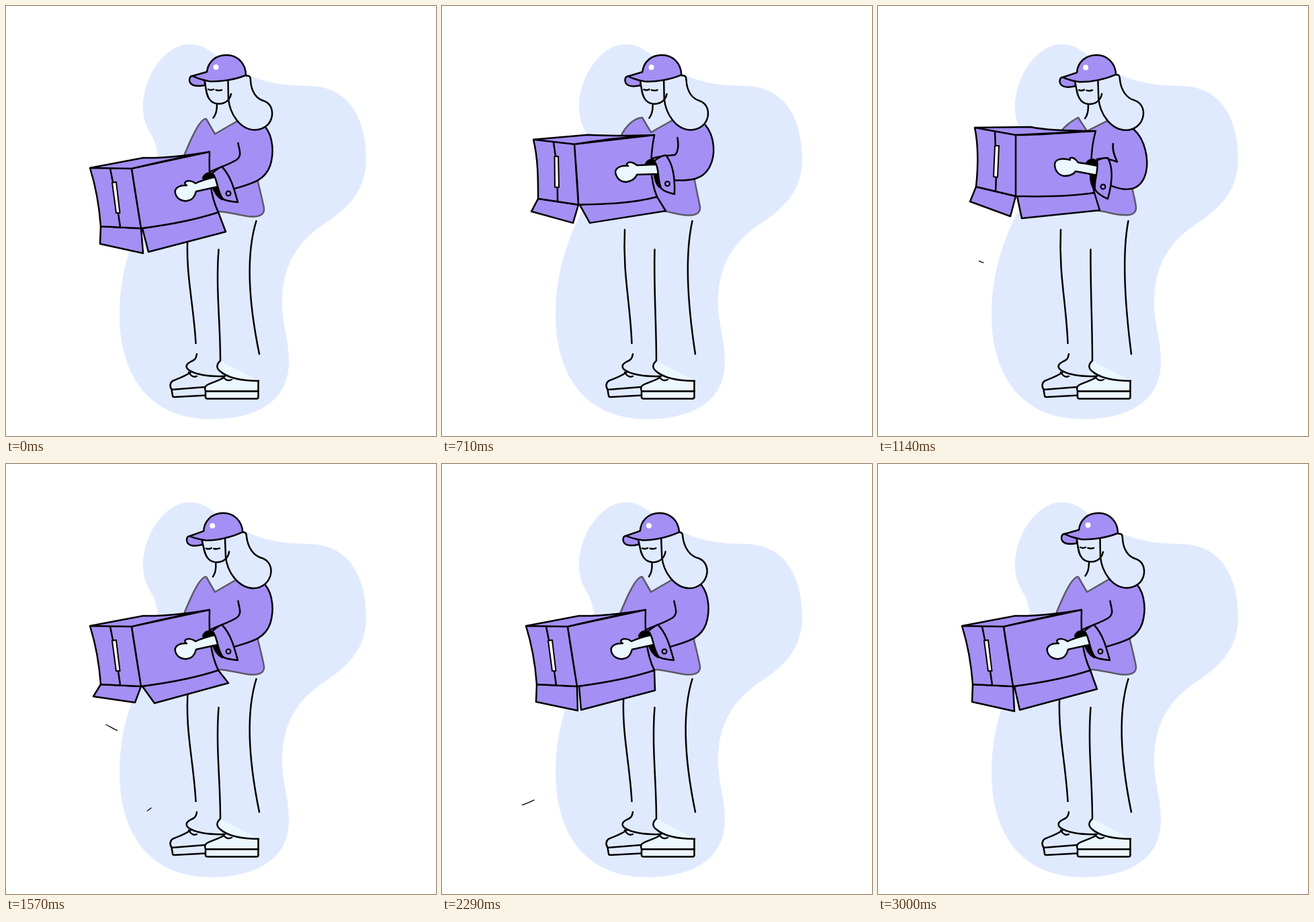
An HTML page with a canvas for the animation above (3.07 s loop, 640 by 640 pixels).

```html
<!DOCTYPE html>
<html lang="en">
<head>
<meta charset="utf-8">
<title>Courier with a box</title>
<style>
html, body { margin: 0; height: 100%; overflow: hidden; background: #fff; }
canvas { display: block; width: 100vw; height: 100vh; }
</style>
</head>
<body>
<canvas width="640" height="640"></canvas>
<script>
const ctx = document.querySelector('canvas').getContext('2d');
const LOOP = 3070, STEP = LOOP / 43;
const PURPLE = '#a48ff4', SKY = '#e0eaff', PALE = '#ebf8ff', INK = '#000', GREY = '#5c5a66';
const NUM = /-?\d+(\.\d+)?/g;

// Monotone cubic through keyed values, held outside the keys
function curve(times, v) {
  const n = times.length;
  const d = i => (v[i + 1] - v[i]) / (times[i + 1] - times[i]);
  const slope = i => {
    if (i === 0 || i === n - 1) return 0;
    const a = d(i - 1), b = d(i);
    return a * b <= 0 ? 0 : 2 * a * b / (a + b);
  };
  return t => {
    if (t <= times[0]) return v[0];
    if (t >= times[n - 1]) return v[n - 1];
    const i = times.findIndex(x => x > t) - 1;
    const w = times[i + 1] - times[i], u = (t - times[i]) / w;
    const s = u * u * (3 - 2 * u);
    return v[i] + (v[i + 1] - v[i]) * s +
      w * u * (1 - u) * (slope(i) * (1 - u) - slope(i + 1) * u);
  };
}

// Morph between path strings that share one structure
function morph(times, paths) {
  const nums = paths.map(p => p.match(NUM).map(Number));
  const curves = nums[0].map((_, i) => curve(times, nums.map(a => a[i])));
  return t => {
    let i = 0;
    return paths[0].replace(NUM, () => curves[i++](t).toFixed(2));
  };
}

const pose = (a, b, c, d) => morph([0, 360, 710, 1140, 1570], [a, b, c, d, a]);

const blob = 'M273 57C300 57 310 75 340 92C385 117 415 118 452 119C510 120 536 167 536 228' +
  'C536 272 512 298 480 320C445 342 411 375 411 440C411 475 421 495 421 530' +
  'C421 590 370 615 305 615C210 615 169 545 169 460C169 400 185 352 208 306' +
  'C232 255 232 230 219 197C211 182 204 173 204 150C204 105 237 57 273 57Z';

const legs = pose(
  'M271 333C266 395 279 440 282.5 502M316.5 362.5C312 420 319 470 319 527M372.5 320C357 370 361 440 377 518',
  'M271 333C266 395 279 440 282.5 502M316.5 362.5C312 420 319 470 319 527M372.5 320C357 370 361 440 377 518',
  'M272 333C269 400 280 440 282.5 502M316.5 362.5C315 420 319 470 319 527M372.5 320C361.5 370 365 440 377 518',
  'M272 333C269 400 280 440 282.5 502M316.5 362.5C316 420 319 470 319 527M372.5 320C363 370 367 440 377 518');

const shirt = pose(
  'M258 240C272 205 288 166 298 168L311 190.5L343 172L384 182L375 262C380 282 382 290 384 301C385 310 378 314 366 313.5C350 313 330 305 314 306Z',
  'M258 240C272 198 289 167 298 168L311 190.5L343 172L388 180L375 262C380 282 382 290 384 301C385 310 378 314 366 313.5C350 313 330 305 314 306Z',
  'M262 205C268 183 284 167 298 166L311 188L343 170L390 180L376 260C380 280 382 288 384 299C385 308 378 312 366 311.5C350 311 338 305 320 304Z',
  'M264 200C276 178 287 172 298 166L311 186L341 171L381 184L379 274C381 284 383 290 384 299C385 308 378 312 366 311C350 311 340 305 322 304Z');

const sleeve = pose(
  'M386 180C398 195 399 220 393 238C385 260 366 264 340 272',
  'M390 177C404 194 406 220 398 238C389 258 374 262 344 266',
  'M392 177C406 194 408 222 398 240C388 258 372 260 346 259.5',
  'M381 184C398 199 403 229 399 247C392 276 370 277 346 267');
const elbow = pose(
  'L303 247C318 240 332 236 343 229C352 222 347 215 345.5 204',
  'L306 238C318 232 332 231 341 227C352 220 348 213 347.5 201',
  'L313 227C323 223 337 223 347 221.5C352 216 352 205 350.5 196',
  'L326 228C336 225 346 228 356 232C353 225 348 215 350 205');

const box = pose(
  'M125 241C134 270 139 300 141 328L201 331C196 300 191 270 187 242ZM187 242C225 233 265 224 303 217C302 250 303 280 316 307C280 319 240 326 201 331ZM125 241L204 226Q245 227 303 217L187 242ZM155 242C161 270 166 300 170 329',
  'M130 220C138 248 141 278 141 307L204 314C199 284 194 253 191 224ZM191 224C230 215 270 209 309 204C308 238 308 268 318 295C282 306 243 311 204 314ZM130 220L210 209Q250 210 309 204L191 224ZM160 223C166 252 169 282 171 311',
  'M136 199C143 228 143 258 143 287L203 296C202 266 199 236 197 206ZM197 206C236 199 276 195 316 192C309 227 310 260 320 284C283 294 243 295 203 296ZM136 199L217 192Q255 194 316 192L197 206ZM166 204C171 233 172 262 172 291',
  'M144 181C150 210 149 240 146 269L205 283C205 252 205 222 205 192ZM205 192C244 192 285 188 324 186C315 217 316 254 322 278C284 284 244 284 205 283ZM144 181L227 180Q255 186 324 186L205 192ZM174 188C175 217 177 247 175 276');

const strip = pose(
  'M158 263L164 262L169.5 308L164 308Z',
  'M163 243L168 243L171.5 289L166 290Z',
  'M167.5 224L173 224L174 270L168 270Z',
  'M174 208L180 208L178 255L172 254Z');

const openFlaps = 'M141 328L140 354L204 368L201 331ZM203 331L212 366L327 336L316 307Z';
const flaps = morph([0, 360, 710, 1140, 1570, 2290, 3000, LOOP], [
  openFlaps,
  'M141 307L139 334L202 350L204 314ZM205 314L213 349L328 323L318 295Z',
  'M143 287L133 306L195 323L203 296ZM205 296L220 323L333 305L320 284Z',
  'M146 269L137 291L197 313L205 283ZM207 283L214 316L330 304L322 278Z',
  'M141 328L130 346L192 355L201 331ZM203 331L221 356L331 326L316 307Z',
  'M141 328L140 354L202 367L201 331ZM204 331L207 366L317 337L316 307Z',
  'M141 328L140 354L203 368L201 331ZM203 331L211 366L326 335L316 307Z',
  openFlaps]);

const lining = pose(
  'M293 256C296 248 304 247 309 250C316 262 318 276 322 288C313 284 309 274 307 267Z',
  'M299 244C303 237 309 238 313 241C319 252 321 266 325 279C318 275 314 267 312 258Z',
  'M303 235C307 227 313 228 318 231C323 243 322 258 326 271C320 268 317 262 316 250Z',
  'M310 234C314 227 321 227 326 231C327 245 321 260 323 274C317 268 316 260 316 250Z');

const hand = pose(
  'M313 254C300 257 290 260 282 264C277 260 270 259 267 262C265 264 267 266 269 267C257 266 250 272 252 279C254 287 262 291 269 290C278 289 281 283 283 276L315 269',
  'M317 246C305 247 296 248 286 249C280 246 274 245 271 248C269 250 270 252 272 252C260 252 254 257 255 264C257 272 264 276 271 276C279 275 284 271 286 264L318 260',
  'M321 236C310 236 300 237 290 237C285 233 279 231 276 234C274 236 275 238 277 238C264 237 258 242 258 248C260 257 266 262 274 262C282 261 288 257 290 251L322 250',
  'M327 238C317 236 307 234 298 233C294 228 291 225 287 226C284 227 285 229 286 229C272 225 263 229 263 236C263 245 269 252 277 253C286 253 291 251 294 246L326 252');

// The last two numbers hold the button centre
const cuff = pose(
  'M307 249C311 245 316 242 321 239C334 252 339 270 345 292C335 291 325 290 322 286C313 272 315 256 307 249ZM331 279',
  'M311 240C316 235 321 232 327 231C338 245 343 265 346 286C336 284 328 282 325 278C316 265 319 248 311 240ZM333.5 272',
  'M316 231C321 226 327 223 333 222C344 235 347 255 346 280C337 278 329 275 326 271C320 258 324 240 316 231ZM335.5 264.5',
  'M326 230C331 227 336 226 342 226C350 240 349 262 342 287C333 283 326 278 323 273C321 260 329 245 326 230ZM335 269');

const nod = curve([0, 360, 710, 1140, 1570, 2290, 3000], [0, 0.03, 0.16, 0.62, 1, 0.85, 0]);
const hair = morph([0, 1], [
  'M358 104C362 103 364 105 364 111C365 128 373 138 383 141C393 144 397 153 396 163C394 177 383 184 370 184.5C348 184 333 160 331 138L330.5 111',
  'M351 101.5C355 101 358 102 358 108C360 125 369 137 381 140C390 143 395 151 394.5 161C393 176 381 185 368 185C345 184 329 160 327 138L326 112']);

// Wind lines: path, start, speed in px per ms
const gusts = [
  ['M157 382C145 377 130 374 118 379C105 384 95 381 84 376', 1110, 0.22],
  ['M170 399C160 394 155 391 149 388C130 380 120 376 108 382C98 387 90 386 80 382', 1400, 0.14],
  ['M216 512C200 525 187 525 172 513C160 502 148 496 137 500C127 505 120 508 112 509C95 512 80 507 61 505', 1520, 0.14]
];

function draw(path, fill, stroke = INK, width = 2.5) {
  const p = new Path2D(path);
  if (fill) {
    ctx.fillStyle = fill;
    ctx.fill(p);
  }
  if (stroke) {
    ctx.strokeStyle = stroke;
    ctx.lineWidth = width;
    ctx.stroke(p);
  }
}

function dot(x, y, r, fill, stroke) {
  draw(`M${x - r} ${y}a${r} ${r} 0 1 0 ${2 * r} 0a${r} ${r} 0 1 0 ${-2 * r} 0Z`, fill, stroke, 2.2);
}

function drawFeet() {
  draw('M284 518C283 526 280 527 274 530C268 533 267 537 271 541C280 548 300 552 326 551');
  draw('M275 545C265 552 255 555 248 558C244 561 243 567 247 571L297 567M246.5 571L248 580Q248 582 251 582L297 579.5');
  draw('M272 545C276 552 280 553 284 551');
  draw('M324 553C315 559 306 560 298 565C295 568 296 572 298 573.5H375.5V558', PALE);
  draw('M319 528C313 533 313 539 318 543C330 554 350 558 376 558', PALE);
  draw('M297 573.5H375.5V582Q375.5 584.5 373 584.5H300Q297 584.5 297 582Z', PALE);
  draw('M323 551C327 558 332 558 336 556');
}

function drawHead(t) {
  const k = nod(t);
  draw(hair(k), SKY);
  ctx.save();
  ctx.translate(326, 175);
  ctx.rotate(-0.064 * k);
  ctx.translate(-326, -175);
  draw('M314 147C314 155 313 161 308.5 166.5');
  draw('M296 113C298 125 298 133 303 139C308 146 318 147 325 144C331 141 334 136 335 131');
  draw('M301 124q4 2 8 0M312.5 125q4.5 1.5 8.5 0');
  draw('M278 104C273 104 272 110 274 114C277 119 285 120 296 118L296 111Z', PURPLE);
  draw('M299 98C301 82 313 73 328 73C345 73 357 86 357 103C340 110 318 113 302 112C293 110 284 108 278 104Z', PURPLE);
  dot(312.5, 91, 4, '#fff', null);
  ctx.restore();
}

function drawGusts(t) {
  for (const [path, start, speed] of gusts) {
    const head = (t - start) * speed;
    if (head <= 0) continue;
    const tail = Math.max(0, head - 19);
    ctx.setLineDash([head - tail, 2000]);
    ctx.lineDashOffset = -tail;
    draw(path, null, INK, 1.3);
  }
  ctx.setLineDash([]);
}

function render(t) {
  ctx.fillStyle = '#fff';
  ctx.fillRect(0, 0, 640, 640);
  ctx.lineCap = ctx.lineJoin = 'round';
  draw(blob, SKY, null);
  draw(legs(t));
  drawFeet();
  draw(shirt(t), PURPLE, GREY);

  const outer = sleeve(t), inner = elbow(t);
  draw(outer + inner, PURPLE, null);
  draw(flaps(t), PURPLE);
  draw(box(t), PURPLE);
  draw(strip(t), '#fff', INK, 2);
  draw(outer + inner.replace('L', 'M'));

  draw(lining(t), INK);
  draw(hand(t), PALE);
  const [edge, button] = cuff(t).split('Z');
  draw(edge + 'Z', PURPLE);
  const [x, y] = button.match(NUM).map(Number);
  dot(x, y, 3.4, null, INK);

  drawHead(t);
  drawGusts(t);
}

const began = performance.now();
function tick() {
  const t = (performance.now() - began) % LOOP;
  render(Math.floor((t + 5) / STEP) % 43 * STEP);
  requestAnimationFrame(tick);
}
tick();
</script>
</body>
</html>
```
